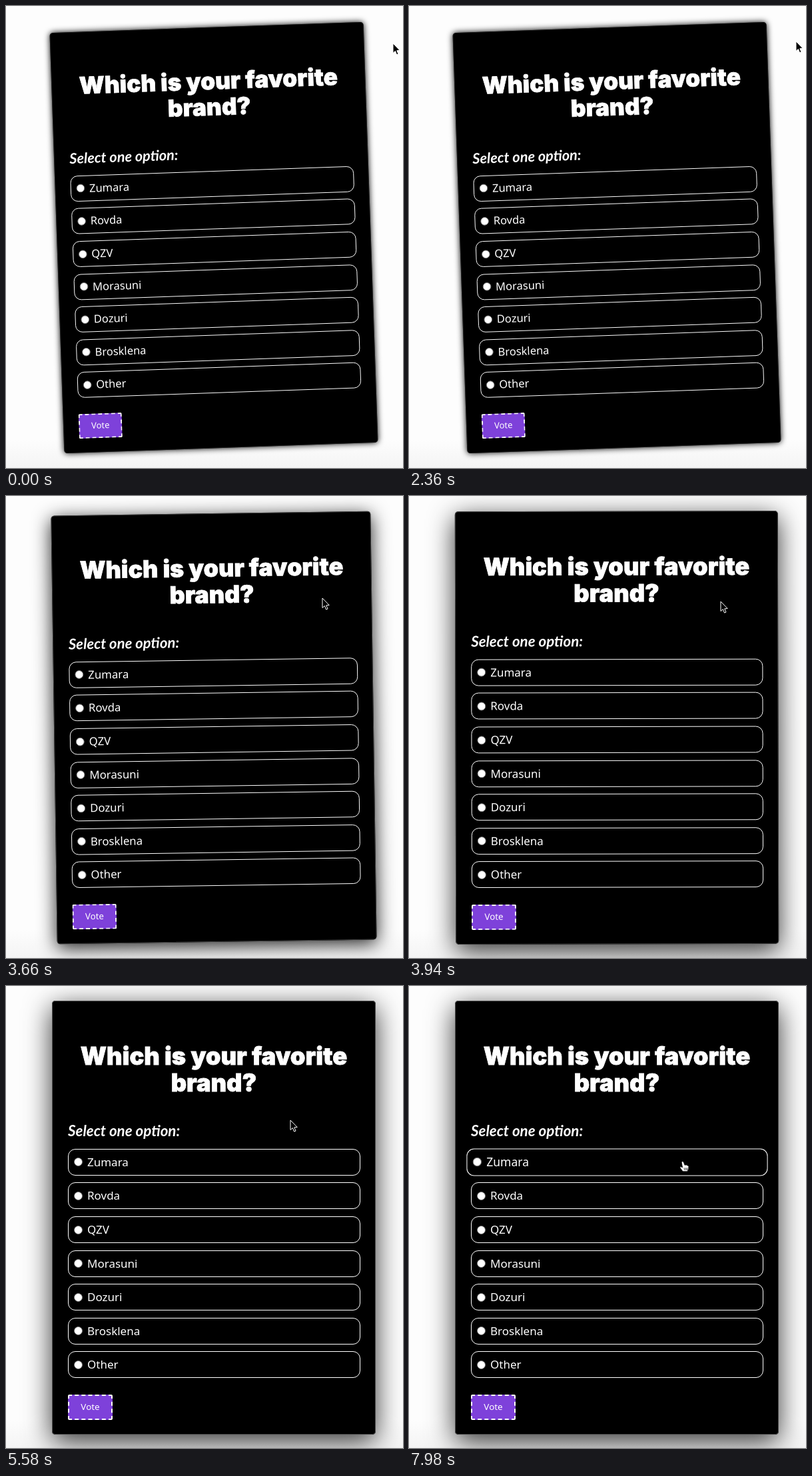
These frames come from a looping animation (596 px wide and 692 px high, 8 s). An HTML page:

```html
<!DOCTYPE html>
<html lang="en">
<head>
<meta charset="utf-8">
<title>Poll card</title>
<style>
  * { box-sizing: border-box; }
  html, body { margin: 0; width: 100%; height: 100%; overflow: hidden; }
  body {
    position: relative;
    background: linear-gradient(#fdfdfd 650px, #f4f4f4 692px);
    font-family: "Noto Sans", "Open Sans", sans-serif;
    color: #fff;
  }
  #card {
    position: absolute; left: 69px; top: 22px; width: 486px; height: 650px;
    background: #000; border-radius: 5px;
  }
  #card > * { position: absolute; margin: 0; white-space: nowrap; }
  h1 {
    left: 0; top: 63px; width: 100%; text-align: center;
    font: 900 36.3px/40px Inter, Roboto, sans-serif;
    -webkit-text-stroke: .8px #fff;
  }
  .lead { left: 24px; top: 180px; font: italic bold 22.4px/30px Lato, sans-serif; }
  .option {
    left: 24px; width: 439px; height: 40px; padding-left: 28px;
    border: 1px solid #fff; border-radius: 11px;
    font-size: 17px; line-height: 37px;
  }
  .option::before {
    content: ""; position: absolute; left: 7.5px; top: 12.5px;
    width: 11px; height: 11px; border-radius: 50%;
    background: #fff; border: 1px solid #767676;
  }
  .vote {
    left: 24px; top: 590px; width: 67px; height: 38px;
    background: #7e41da; border: 2px dashed #fff; border-radius: 2px;
    font-size: 13.4px; line-height: 33px; text-align: center;
  }
  #pointer { position: absolute; left: 0; top: 0; overflow: visible; }
</style>
</head>
<body>
<div id="card">
  <h1>Which is your favorite<br>brand?</h1>
  <p class="lead">Select one option:</p>
  <div class="vote">Vote</div>
</div>
<svg id="pointer" width="24" height="24">
  <path id="arrow" d="M0 0V14.5L3.4 11.5 5.6 17 8 16 5.8 10.8 10.2 10.5Z"
        fill="#000" stroke="#fff" stroke-width="1"/>
  <g id="hand" stroke="#000" stroke-width=".8" stroke-linejoin="round">
    <path d="M-2 1Q-1-1 1 .5L3 5.5 5 5 7 6 9 7Q9 11 7 15H0L-4 9.5Q-5 7 -2.5 8L-.5 9Z" fill="#fff"/>
    <path d="M2 9.5L2.7 13M4.3 9.5L4.7 13M6.5 9.5L6.4 13" fill="none"/>
  </g>
</svg>
<script>
const LOOP = 8000;
const CARD_HOVER = { start: 3390, length: 800 };
const OPTION_HOVER = { start: 6600, length: 300 };
const HAND_FROM = 7060;
const OPTIONS = ["Zumara", "Rovda", "QZV", "Morasuni", "Dozuri", "Brosklena", "Other"];

// time, x, y of the pointer tip
const PATH = [
  [0, 581, 56], [400, 581, 55], [1700, 581, 55], [2200, 581, 53], [2900, 581, 53],
  [3390, 536, 97], [3660, 475, 153], [3940, 468, 158], [4700, 445, 183],
  [5580, 427, 201], [6500, 418, 236], [6980, 414, 245], [7500, 412, 258], [8000, 411, 263]
];

const $ = id => document.getElementById(id);
const card = $("card"), pointer = $("pointer"), arrow = $("arrow"), hand = $("hand");
const mix = (a, b, p) => a + (b - a) * p;

const rows = OPTIONS.map((name, i) => {
  const row = document.createElement("div");
  row.className = "option";
  row.textContent = name;
  row.style.top = 221.8 + 50.6 * i + "px";
  card.append(row);
  return row;
});

// CSS "ease": cubic-bezier(.25, .1, .25, 1)
function ease(x) {
  if (x <= 0) return 0;
  if (x >= 1) return 1;
  const curve = (a, b, s) => 3 * a * s * (1 - s) ** 2 + 3 * b * s * s * (1 - s) + s ** 3;
  let lo = 0, hi = 1;
  for (let i = 0; i < 24; i++) {
    const mid = (lo + hi) / 2;
    if (curve(.25, .25, mid) < x) lo = mid; else hi = mid;
  }
  return curve(.1, 1, lo);
}

const progress = (t, { start, length }) => ease((t - start) / length);

function pointerAt(t) {
  const i = PATH.findIndex(key => key[0] > t);
  const [t0, x0, y0] = PATH[i - 1], [t1, x1, y1] = PATH[i];
  const p = (t - t0) / (t1 - t0);
  return [mix(x0, x1, p), mix(y0, y1, p)];
}

function draw(t) {
  const p = progress(t, CARD_HOVER);
  card.style.transform = `rotate(${mix(-2, 0, p)}deg) scale(${mix(.97, 1, p)})`;
  card.style.boxShadow = [
    `inset 0 0 0 1px rgba(80,80,80,${mix(.4, 1, p)})`,
    `0 ${mix(0, 10, p)}px ${mix(10, 40, p)}px rgba(0,0,0,${mix(1, .8, p)})`
  ].join();

  const h = progress(t, OPTION_HOVER);
  rows[0].style.transform = `scale(${1 + .03 * h})`;

  const [x, y] = pointerAt(t);
  const pointing = t >= HAND_FROM;
  pointer.style.transform = `translate(${x}px, ${y}px)`;
  arrow.style.display = pointing ? "none" : "";
  hand.style.display = pointing ? "" : "none";
}

const begin = performance.now();
function tick() {
  draw((performance.now() - begin) % LOOP);
  requestAnimationFrame(tick);
}
tick();
</script>
</body>
</html>
```
